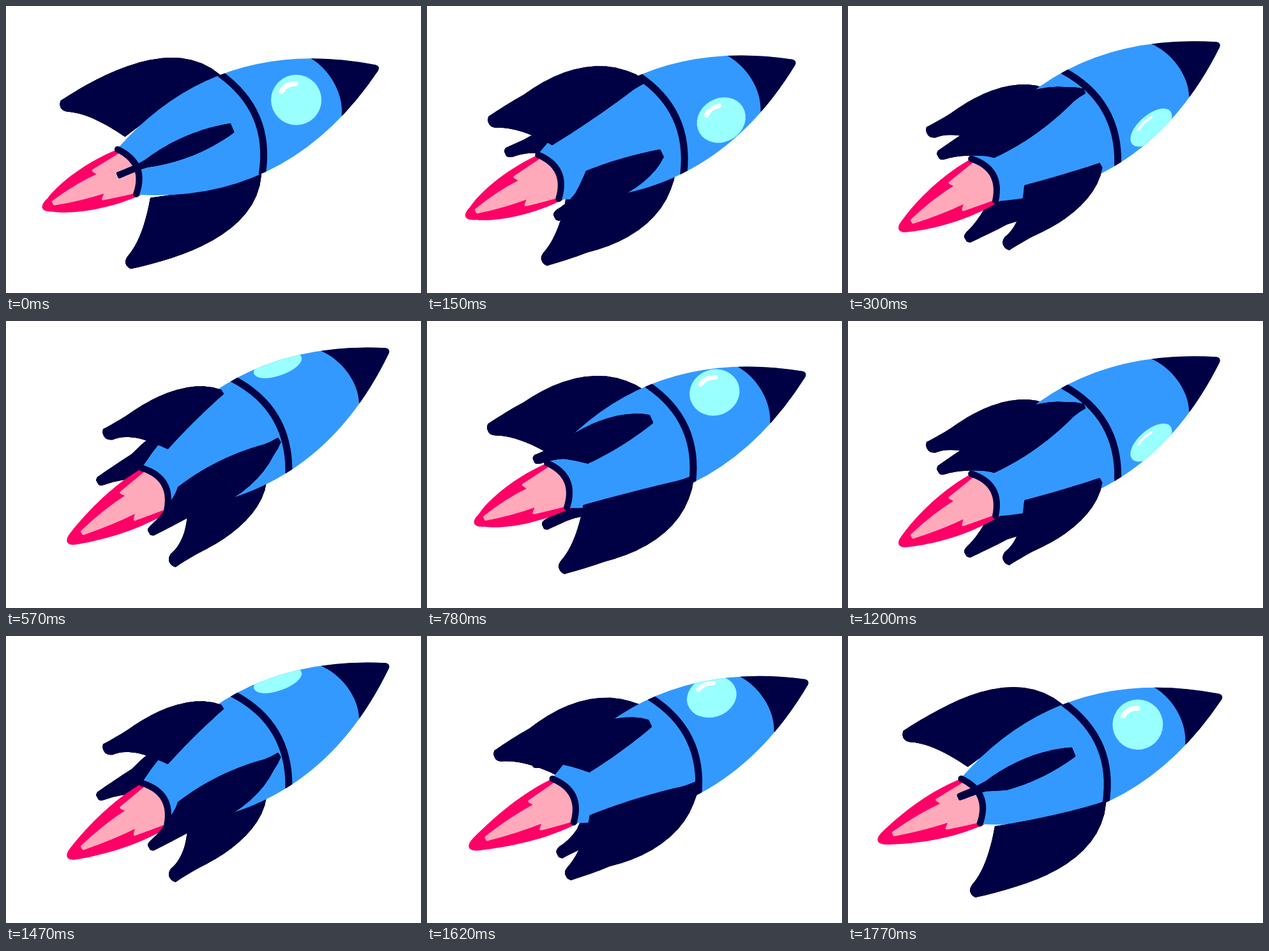
These frames come from a looping animation (650x450 px, 1800 ms). An HTML page with a canvas:

```html
<!DOCTYPE html>
<html lang="en">
<head>
<meta charset="utf-8">
<title>Spinning rocket</title>
<style>
html, body { margin: 0; width: 100%; height: 100%; overflow: hidden; background: #fff; }
canvas { display: block; }
</style>
</head>
<body>
<canvas id="stage" width="650" height="450"></canvas>
<script>
const ctx = document.getElementById('stage').getContext('2d');
const NAVY = '#000044', BLUE = '#3399ff', RED = '#ff0066', PINK = '#ffaabb', CYAN = '#99ffff';
const PERIOD = 900, STEP = 30, TAU = Math.PI * 2;

// Rocket space: x runs along the axis (nose at 0, tail negative), y is up.
const body = new Path2D('M-4 5 Q-214 144 -428 39 Q-394 0 -428 -39 Q-214 -144 -4 -5 Q2 0 -4 5Z');
const cone = new Path2D('M-95 55 C-72 25 -68 -20 -84 -48 L10 -60 L10 60Z');
const longFin = finOutline(-237, 167, -480, 141);
const shortFin = finOutline(-267, 139, -455, 130);

// Points on a Bezier curve of any degree.
function bezier(...ctrl) {
  const mix = (a, b, t) => a.map((v, i) => v + (b[i] - v) * t);
  return Array.from({ length: 16 }, (_, k) => {
    let pts = ctrl;
    while (pts.length > 1) pts = pts.slice(1).map((p, i) => mix(pts[i], p, k / 16));
    return pts[0];
  });
}

// Fin in its own plane: outer edge, tip, trailing edge, root.
function finOutline(root, span, tip, reach) {
  const start = [root, 84], end = [tip, reach], heel = [tip + 4, reach - 17], hip = [tip + 71, 54];
  return [
    bezier(start, [root - 42, span], [root - 167, span - 12], end),
    bezier(end, [tip - 8, reach - 10], heel),
    bezier(heel, [tip + 36, 108], hip),
    bezier(hip, [(root + hip[0]) / 2, 78], start)
  ].flat();
}

function wave(t, mid, amp, peak, period = PERIOD) {
  return mid + amp * Math.cos(TAU * (t - peak) / period);
}

function fill(path, color) {
  ctx.fillStyle = color;
  ctx.fill(path);
}

function stroke(path, color, width) {
  ctx.strokeStyle = color;
  ctx.lineWidth = width;
  ctx.stroke(path);
}

function polygon(pts) {
  const path = new Path2D('M' + pts.join('L') + 'Z');
  fill(path, NAVY);
  stroke(path, NAVY, 4);
}

// A fin is a plate, thickest in the middle, swept between its two faces.
function drawFin({ outline, angle }) {
  const sin = Math.sin(angle), cos = Math.cos(angle);
  const face = side => outline.map(([x, r]) => {
    const half = 3 + 11 * Math.max(0, 1 - ((x + 335) / 80) ** 2);
    return [x + 16 * cos, r * sin + side * half * cos];
  });
  const a = face(1), b = face(-1);
  polygon(a);
  polygon(b);
  a.forEach((p, i) => {
    const j = (i + 1) % a.length;
    polygon([p, a[j], b[j], b[i]]);
  });
}

function drawFlame(len) {
  const neck = 13 - len, end = -len - 4;
  fill(new Path2D(`M-420 38 C-480 40 -535 24 ${neck} 9 C${end} 3 ${end} -7 ${neck} -13
    C-535 -28 -480 -44 -420 -42Z`), RED);
  const tip = -295 - len * 0.45;
  const inner = new Path2D(`M-425 30 L-476 22 L-470 13 Q-510 12 ${tip} 1 L${tip} -3
    Q-512 -13 -470 -16 L-479 -25 Q-455 -30 -424 -35 L-405 -25 L-405 25Z`);
  fill(inner, PINK);
  stroke(inner, PINK, 4);
}

function drawBand(x, bulge, radius, width) {
  stroke(new Path2D(`M${x} ${radius} Q${x + 2 * bulge} 0 ${x} ${-radius}`), NAVY, width);
}

function drawWindow(angle) {
  const sin = Math.sin(angle), cos = Math.cos(angle);
  if (cos < 0.02) return;
  ctx.save();
  ctx.translate(-179 + 39 * cos, 2 + 72 * sin);
  ctx.rotate(-0.22 * sin);
  ctx.scale(1, cos);
  const glass = new Path2D();
  glass.arc(0, 0, 39.5, 0, TAU);
  fill(glass, CYAN);
  stroke(new Path2D('M-16 21 Q-6 30 9 24'), '#fff', 8);
  ctx.restore();
}

function draw(t) {
  const spin = Math.PI * t / PERIOD;
  const fins = [0, 1, 2, 3].map(i => ({
    outline: i % 2 ? longFin : shortFin,
    angle: i * Math.PI / 2 - spin
  }));
  const inFront = fin => Math.cos(fin.angle) > 0.02;

  ctx.setTransform(1, 0, 0, 1, 0, 0);
  ctx.clearRect(0, 0, 650, 450);
  ctx.lineCap = ctx.lineJoin = 'round';
  ctx.translate(wave(t, 589.5, 11.5, 612), wave(t, 67.5, -28.5, 480));
  ctx.rotate(-wave(t, 27.5, -4.9, 0) * Math.PI / 180);
  ctx.scale(1, -1);

  fins.filter(fin => !inFront(fin)).forEach(drawFin);
  drawFlame(wave(t, 582, 11, 75, PERIOD / 7));
  fill(body, BLUE);
  ctx.save();
  ctx.clip(body);
  fill(cone, NAVY);
  drawWindow(-spin);
  drawWindow(Math.PI - spin);
  drawBand(-234, 26, 85, 11);
  ctx.restore();
  drawBand(-428, 17, 38, 10);
  fins.filter(inFront).forEach(drawFin);
}

function frame() {
  draw(Math.floor(performance.now() / STEP) * STEP % PERIOD);
  requestAnimationFrame(frame);
}
frame();
</script>
</body>
</html>
```
